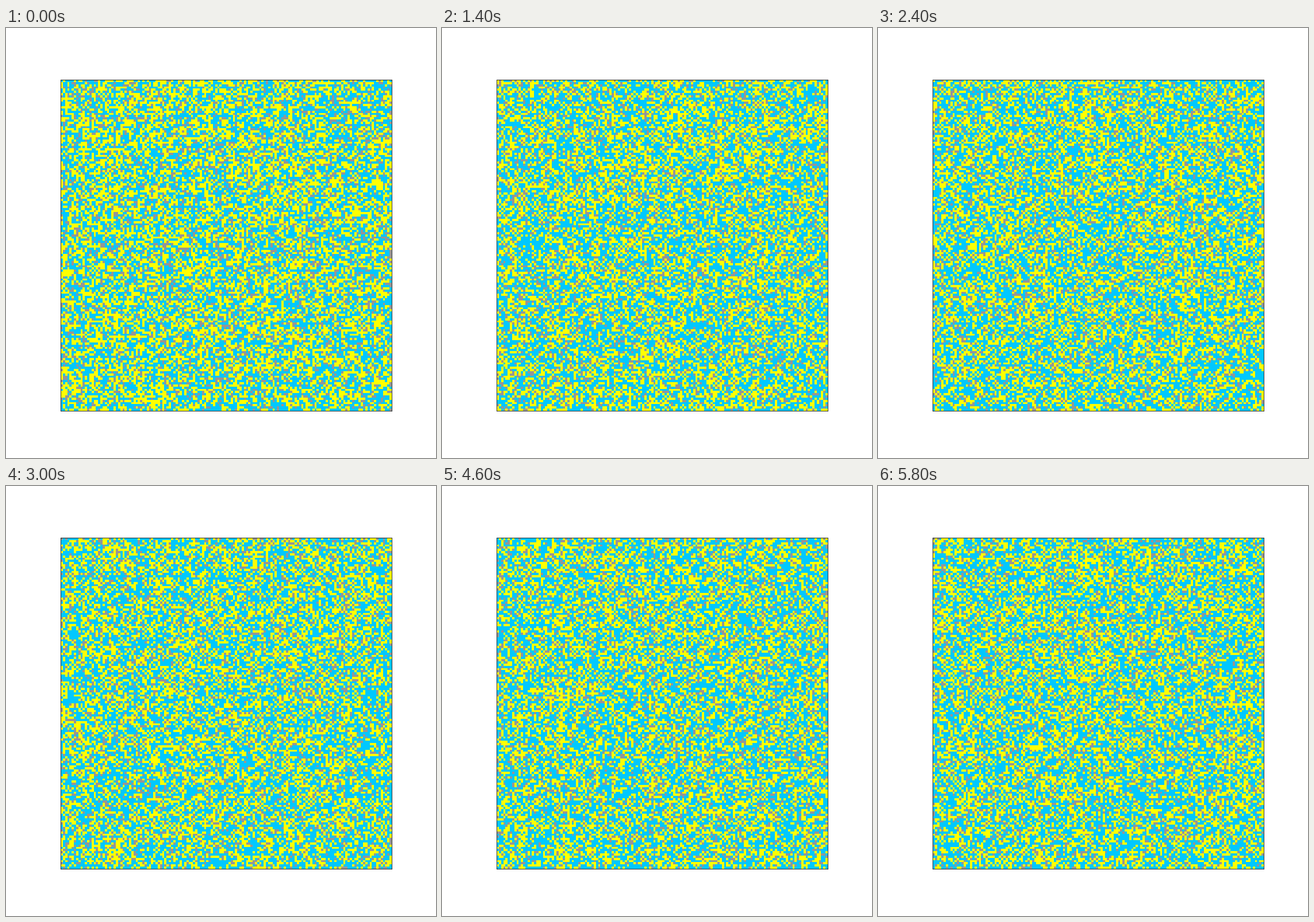
These frames come from a looping animation (748x748 px, 6000 ms). A matplotlib script:

```python
import numpy as np
import matplotlib.pyplot as plt
from matplotlib.animation import FuncAnimation
from matplotlib.colors import ListedColormap

SIZE = 150
STEPS = 28
REST, SPENT, ACTIVE = range(3)
COLORS = ListedColormap(["#00c8ff", "#969696", "#ffff00"])

SPREAD = 0.65  # how strongly active neighbours wake a resting cell
CROWD = 1.5    # above 1, groups wake cells more than lone neighbours do
TIRE = 0.32    # active -> spent
CALM = 0.46    # active -> resting

rng = np.random.default_rng(12)


def step(grid):
    active = grid == ACTIVE
    near = sum(np.roll(active, shift, axis).astype(int)
               for shift in (-1, 1) for axis in (0, 1))
    chance = rng.random(grid.shape)
    new = np.full_like(grid, REST)
    new[(grid == REST) & (chance < 1 - np.exp(-SPREAD * near ** CROWD))] = ACTIVE
    new[active & (chance < TIRE)] = SPENT
    new[active & (chance >= TIRE + CALM)] = ACTIVE
    return new


grids = [rng.choice(3, (SIZE, SIZE), p=[0.45, 0.13, 0.42])]
for _ in range(STEPS):
    grids.append(step(grids[-1]))

fig, ax = plt.subplots(figsize=(748 / 72, 748 / 72), dpi=72)
image = ax.imshow(grids[0], cmap=COLORS, vmin=0, vmax=2, interpolation="nearest")
ax.set_xticks([])
ax.set_yticks([])


def update(i):
    # the opening grid is held for two ticks
    image.set_data(grids[max(i - 1, 0)])
    return [image]


anim = FuncAnimation(fig, update, frames=STEPS + 2, interval=200,
                     repeat=True, repeat_delay=0)
plt.show()
```
